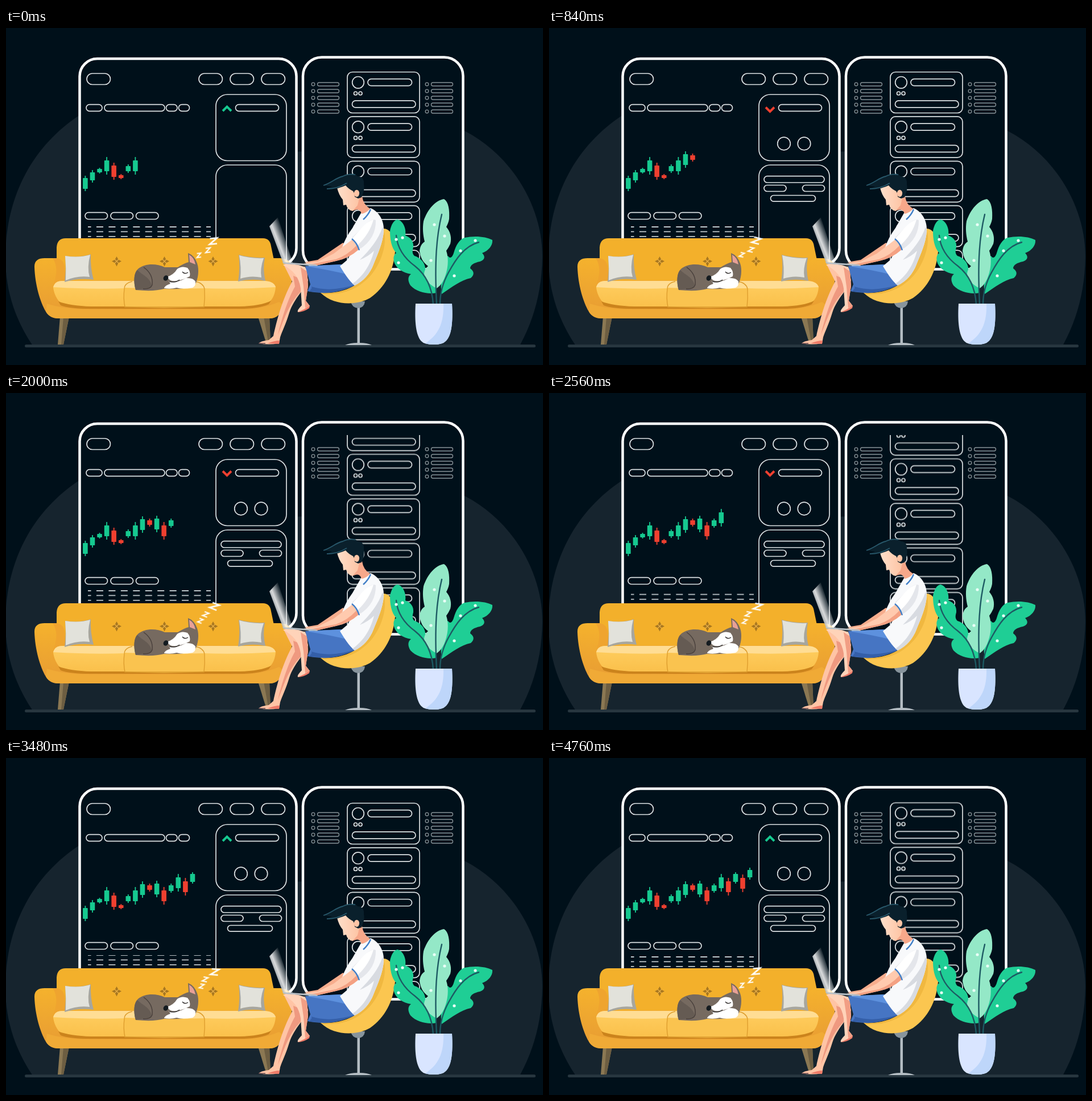
These frames come from a looping animation (944x593 px, 4800 ms). An HTML page:

```html
<!DOCTYPE html>
<html lang="en">
<head>
<meta charset="utf-8">
<title>Trading from home</title>
<style>
  html, body { margin: 0; width: 100%; height: 100%; overflow: hidden; background: #00101a; }
  svg { display: block; width: 944px; height: 593px; }
  .ui { fill: none; stroke: #dde1e3; stroke-width: 1.7; }
  .frame { fill: #00101a; stroke: #fff; stroke-width: 4.5; }
  .dim { opacity: .62; stroke-width: 1.3; }
  .anim, .z, .candle { animation: 4.8s linear infinite; }

  #cards { animation-name: cards; }
  @keyframes cards {
    0%, 22.9% { transform: translateY(0); animation-timing-function: ease-in; }
    33.33% { transform: translateY(10.5px); animation-timing-function: ease-out; }
    50.8% { transform: translateY(40.5px); animation-timing-function: ease-in-out; }
    65.83% { transform: translateY(3.5px); animation-timing-function: ease-out; }
    79.17%, 100% { transform: translateY(1.3px); }
  }
  #rows { animation-name: rows; }
  @keyframes rows {
    0%, 17.5% { transform: translateY(0); }
    33.33% { transform: translateY(-.8px); }
    53.33% { transform: translateY(-3.9px); }
    65.83% { transform: translateY(-2.9px); }
    79.17% { transform: translateY(-3.3px); }
    93%, 100% { transform: translateY(0); }
  }
  #buttons { animation-name: buttons; }
  @keyframes buttons { 0%, 5% { opacity: 0; } 9%, 100% { opacity: 1; } }
  #fields { animation-name: fields; }
  @keyframes fields { 0%, 8% { opacity: 0; } 12%, 100% { opacity: 1; } }

  #up { animation-name: up; animation-timing-function: step-end; }
  @keyframes up {
    0% { opacity: 1; } 16.33% { opacity: 0; } 59.5% { opacity: 1; }
    73.5% { opacity: 0; } 81.7%, 100% { opacity: 1; }
  }
  #down { animation-name: down; animation-timing-function: step-end; }
  @keyframes down {
    0% { opacity: 0; } 16.33% { opacity: 1; } 59.5% { opacity: 0; }
    73.5% { opacity: 1; } 81.7%, 100% { opacity: 0; }
  }
  #drop { animation-name: drop; }
  @keyframes drop {
    0%, 16.3% { transform: translateY(3px); }
    20%, 73.4% { transform: none; }
    73.5% { transform: translateY(3px); }
    77%, 100% { transform: none; }
  }

  .z { fill: none; stroke: #fff; }
  #z1 { animation-name: z1; }
  @keyframes z1 {
    0%, 100% { transform: translate(339px, 400px) rotate(-8deg); }
    17.5% { transform: translate(339px, 399px) rotate(12deg); }
    33.33% { transform: translate(340px, 400px) rotate(28deg); }
    53.33% { transform: translate(344px, 402px) rotate(10deg); }
    65.83% { transform: translate(345px, 402px) rotate(2deg); }
    79.17% { transform: translate(343px, 401px) rotate(18deg); }
  }
  #z2 { animation-name: z2; }
  @keyframes z2 {
    0%, 100% { transform: translate(355px, 391px) rotate(-8deg); }
    17.5% { transform: translate(355px, 390px) rotate(12deg); }
    33.33% { transform: translate(352px, 390px) rotate(28deg); }
    53.33% { transform: translate(350px, 389px) rotate(10deg); }
    65.83% { transform: translate(350px, 388px) rotate(0deg); }
    79.17% { transform: translate(350px, 391px) rotate(22deg); }
  }
  #z3 { animation-name: z3; }
  @keyframes z3 {
    0%, 100% { transform: translate(364.5px, 375px) rotate(-6deg); }
    17.5% { transform: translate(364.5px, 374px) rotate(14deg); }
    33.33% { transform: translate(366px, 375px) rotate(30deg); }
    53.33% { transform: translate(367px, 376px) rotate(10deg); }
    65.83% { transform: translate(367px, 376px) rotate(-3deg); }
    79.17% { transform: translate(367px, 377px) rotate(12deg); }
  }
</style>
</head>
<body>
<svg viewBox="0 0 944 593">
  <defs>
    <clipPath id="listClip"><rect x="598" y="74.3" width="132" height="334"/></clipPath>
    <clipPath id="rowClip"><rect x="140" y="347.4" width="222" height="40"/></clipPath>
    <linearGradient id="screen" x1="474" y1="379" x2="494" y2="371" gradientUnits="userSpaceOnUse">
      <stop offset="0" stop-color="#b9bec1" stop-opacity=".9"/><stop offset=".25" stop-color="#fff" stop-opacity=".85"/>
      <stop offset="1" stop-color="#fff" stop-opacity="0"/>
    </linearGradient>
    <linearGradient id="skin"><stop offset="0" stop-color="#ffdfca"/><stop offset="1" stop-color="#fdc3a3"/></linearGradient>
    <linearGradient id="arm" x2="0" y2="1"><stop offset="0" stop-color="#f5b22d"/><stop offset="1" stop-color="#e79b34"/></linearGradient>
    <linearGradient id="seat" x2="0" y2="1"><stop offset="0" stop-color="#ffce60"/><stop offset="1" stop-color="#fac04b"/></linearGradient>
  </defs>

  <path fill="#16242e" d="M47 559C14 510 -1 458 -1 405C-1 290 52 205 127 155C230 90 390 150 460 200C500 224 530 221 560 205C640 145 740 150 806 181C890 224 943 315 943 402C942 465 927 515 903 559Z"/>
  <rect x="33" y="557" width="898" height="5" rx="2.5" fill="#27363f"/>

  <!-- chart window -->
  <rect class="frame" x="129.5" y="54" width="381" height="364" rx="31"/>
  <g id="chartUi" class="ui">
    <rect x="369" y="117" width="124" height="116.5" rx="20"/>
    <rect x="369" y="241" width="124" height="190" rx="20"/>
  </g>
  <g id="buttons" class="ui anim"><circle cx="413" cy="203.5" r="11.3"/><circle cx="448.5" cy="203.5" r="11.3"/></g>
  <g id="fields" class="ui anim"></g>
  <g fill="none" stroke-width="4">
    <path id="up" class="anim" stroke="#16c990" d="M381 146L388.5 138.5L396 146"/>
    <g id="drop" class="anim"><path id="down" class="anim" stroke="#f04030" d="M381 137.5L388.5 145L396 137.5"/></g>
  </g>
  <g id="candles"></g>
  <g clip-path="url(#rowClip)"><g id="rows" class="anim" stroke="#c3c9cd" stroke-width="1.8"></g></g>

  <!-- list window -->
  <rect class="frame" x="522" y="51.5" width="281.5" height="373" rx="33"/>
  <g id="side" class="ui dim"></g>
  <g clip-path="url(#listClip)"><g id="cards" class="ui anim"></g></g>

  <!-- sofa -->
  <path fill="#8b7853" d="M95 508H111L101 557H91Z"/><path fill="#6d5e42" d="M101 508H111L101 557H97Z"/>
  <path fill="#8b7853" d="M443 508H463L465 553H457Z"/><path fill="#6d5e42" d="M453 508H463L465 553H461Z"/>
  <path fill="#f3b02b" d="M89 470V386Q90 370 105 370H452Q464 370 466 384L471 408V470Z"/>
  <path fill="url(#arm)" d="M50 420C50 409 57 405 68 405H88Q101 406 103 420L105 444H452L456 419Q457 406 470 405H482Q496 406 500 414L503 440C500 465 492 485 484 499Q477 511 464 511H92Q77 511 70 499C60 482 51 452 50 420Z"/>
  <path fill="#efa42f" d="M82 405H88Q101 406 103 420L105 446L83 452C90 435 91 418 82 405Z"/>
  <path fill="url(#seat)" d="M83 456Q86 445 99 445H455Q471 446 474 456C473 467 470 476 462 483Q444 491 410 491H150Q112 491 95 483C87 474 84 465 83 456Z"/>
  <path fill="#ffdd94" d="M83 456Q86 445 99 445H455Q471 446 474 456Q410 460 348 458H208Q150 460 83 456Z"/>
  <path fill="#cb831c" d="M92 481Q112 489 150 490H410Q448 489 466 480L462 486Q444 494 410 494H150Q112 494 96 488Z"/>
  <path fill="#f0aa36" d="M72 485Q100 495 150 495H410Q450 495 480 482L489 489Q480 511 464 511H92Q77 511 70 499Z"/>
  <path fill="#fac34f" d="M208 457Q212 447 227 446H335Q347 448 349 458L348 490Q278 495 208 490Z"/>
  <path fill="#ffdd94" d="M208 457Q212 447 227 446H335Q347 448 349 458Q278 460 208 457Z"/>
  <path fill="none" stroke="#dc9b2c" stroke-width="1.3" d="M222 446Q208 449 208 459Q206 476 209 491H348Q350 475 349 459Q347 449 333 446"/>
  <g id="studs"></g>
  <path fill="#a7a69e" d="M104 401Q128 405 149 398Q148 422 154 443Q128 439 103 447Q106 423 104 401Z"/>
  <path fill="#e2e2db" d="M104 401Q128 405 148 399Q142 422 147 438Q126 435 105 444Q106 423 104 401Z"/>
  <path fill="#a7a69e" d="M409 399Q430 405 455 404Q451 424 456 445Q432 440 408 446Q412 421 409 399Z"/>
  <path fill="#e2e2db" d="M410 400Q430 406 453 405Q446 424 449 439Q430 435 412 441Q414 421 410 400Z"/>

  <!-- dog -->
  <path fill="#766a60" d="M228 461C224 447 224 431 232 424C244 414 264 414 279 421L302 421Q313 414 321 412L320 396Q331 400 336 414C340 425 338 442 332 452Q318 461 278 459Q260 464 228 461Z"/>
  <path fill="#655b53" d="M228 461C224 447 225 431 231 426C240 435 252 438 256 452Q254 460 242 459Z"/>
  <path fill="none" stroke="#483f3b" stroke-width="1.4" d="M242 421Q259 433 257 452Q254 460 241 459"/>
  <path fill="#e8a097" d="M322 399Q331 404 333 416L323 412Z"/>
  <path fill="#fff" d="M283 438Q295 434 301 424Q309 418 319 422Q325 429 323 437Q312 443 300 445Q288 447 283 438Z"/>
  <path fill="#fff" d="M286 445Q300 450 316 440Q329 439 333 446Q334 454 328 457Q310 460 300 457Q290 460 278 458Q279 453 289 450Z"/>
  <path fill="none" stroke="#33302f" stroke-width="1.4" d="M310 429Q314 434 320 430M287 446Q298 449 305 443"/>
  <ellipse cx="281" cy="440" rx="4.2" ry="5" fill="#141b20" transform="rotate(30 281 440)"/>
  <path id="z1" class="z" stroke-width="1.9" d="M-3-3.5H4L-4 3.5H3.5"/>
  <path id="z2" class="z" stroke-width="2.1" d="M-3.5-3.7H4.5L-4.5 3.7H4"/>
  <path id="z3" class="z" stroke-width="2.7" d="M-5.5-5H7L-7 5H6"/>

  <!-- chair -->
  <path fill="#b4bdc3" d="M617.5 485H622V554Q635 554 643 558H596Q605 554 617.5 554Z"/>
  <path fill="#87949c" d="M606 481H631Q630 492 619 493Q608 492 606 481Z"/>
  <path fill="#fbc650" d="M663 353C677 352 685 372 684 394C681 428 666 457 640 475C618 488 578 490 553 466C580 470 602 460 614 454C636 444 652 400 663 353Z"/>
  <path fill="#f0b840" d="M665 358C671 390 652 430 629 447C609 464 583 470 557 468L553 466C580 468 602 460 614 452C636 444 654 400 665 358Z"/>

  <!-- plant -->
  <g fill="#1fce95">
    <path d="M757 466C742 469 722 465 711 453C706 445 706 437 712 433C698 431 687 423 683 414C680 406 681 399 686 396C677 386 675 371 675 357C677 346 682 338 688 337C698 339 704 353 702 365C712 369 717 376 716 386C714 393 714 397 718 401C728 404 736 412 737 422C738 430 742 431 746 436C756 447 757 457 757 466Z"/>
    <path d="M766 468C763 450 766 436 771 426C765 416 768 405 777 401C780 406 784 405 787 396C791 382 797 372 806 369C824 365 844 367 855 373C856 383 848 392 837 396C843 402 842 408 833 411C823 413 816 417 816 423C823 428 824 434 817 440C799 444 785 455 766 468Z"/>
  </g>
  <path fill="#94e8c7" d="M757 458C744 452 736 442 735 432C736 426 738 422 742 419C733 413 728 403 727 392C728 384 731 379 736 376C733 364 732 352 734 340C741 319 755 303 770 301C778 306 780 320 779 336C778 342 776 346 774 350C781 358 784 369 781 380C778 386 776 389 774 392C779 407 777 426 770 442C766 450 762 455 757 458Z"/>
  <g fill="none" stroke="#1d5a63" stroke-width="2.4" stroke-linecap="round">
    <path d="M686 365C688 388 700 405 719 419C738 434 749 455 751 486"/>
    <path d="M766 328C757 365 753 410 757 486"/>
    <path d="M831 377C805 384 790 408 778 430C768 448 763 465 763 486"/>
  </g>
  <g fill="#e9fff7">
    <circle cx="686" cy="372" r="2.6"/><circle cx="697" cy="369" r="2.6"/><circle cx="690" cy="413" r="2.6"/>
    <circle cx="753" cy="346" r="2.6"/><circle cx="747" cy="409" r="2.6"/><circle cx="771" cy="366" r="2.6"/>
    <circle cx="825" cy="374" r="2.6"/><circle cx="799" cy="392" r="2.6"/><circle cx="788" cy="436" r="2.6"/>
  </g>
  <path fill="#d9e5ff" d="M720 485H784C786 520 783 542 773 551Q768 557 752 557Q735 557 730 551C721 541 718 518 720 485Z"/>
  <path fill="#bed6fa" d="M769 485H784C786 520 783 542 773 551Q767 557 752 557Q744 557 737 555C760 540 770 520 769 485Z"/>

  <!-- laptop and person -->
  <path fill="url(#screen)" d="M463 349L478 333L504 413H487Z"/>
  <path fill="#ffc4a5" d="M488 416L526 420L531 444C527 458 507 474 498 501C492 521 486 532 482 544L480 555Q461 558 444 555Q447 551 462 549L470 542C476 515 485 479 503 446Z"/>
  <path fill="#ef9980" d="M505 436L508 455C497 474 486 506 478 540C488 516 496 486 518 464L522 443Z"/>
  <path fill="#ffd3b9" d="M492 415Q522 415 529 425L531 454L527 480L534 489Q525 498 513 500Q511 497 520 488L518 458C515 438 505 426 487 417Z"/>
  <path fill="#f29e84" d="M518 421L529 428L531 454L527 480L534 489L526 493L523 455Z"/>
  <path fill="#ef7b68" d="M513 500Q523 496 534 489L533 493Q523 500 513 500ZM460 555Q472 550 481 550L480 556Z"/>
  <path stroke="#513943" stroke-width="1.3" d="M444 555H456"/>
  <path fill="#4675c3" d="M526 419L590 416Q600 440 615 452Q590 464 565 466Q548 467 530 463L535 451Z"/>
  <path fill="#5d91de" d="M526 419L590 416L602 434Q570 426 526 419Z"/>
  <path fill="#345fa9" d="M532 464Q539 458 537 455Q572 466 615 451Q589 465 565 466Z"/>
  <path fill="#f7ad8d" d="M592 378L606 384L580 406L538 415L525 412L548 408Z"/>
  <path fill="#f8f9fb" d="M625 324L641 317C656 323 665 340 664 356C663 378 653 398 646 416C640 432 628 446 613 453C602 444 594 430 587 419L600 408L610 390L591 386Q597 368 609 352Z"/>
  <path fill="#d8dbe1" d="M662 350C655 372 640 390 622 408Q637 402 647 392C640 420 626 438 609 450L613 453C628 446 640 432 646 416C653 398 663 378 664 356Z"/>
  <path fill="#e4e6eb" d="M650 338Q642 335 633 345L608 369L622 389Q651 370 650 338Z"/>
  <path fill="#fff" d="M646 337Q635 340 624 353L609 370L618 382Q639 363 646 337Z"/>
  <path fill="#ffcaae" d="M609 372L621 389Q602 406 580 410L545 418L523 414L548 411L576 397Z"/>
  <path fill="#f4a183" d="M616 383L621 389Q602 406 580 410L545 418L535 416L580 407Q600 400 616 383Z"/>
  <path fill="none" stroke="#417fc7" stroke-width="2.4" d="M608 371Q617 378 621 391M628 337Q637 329 641 319"/>
  <path fill="#b9c1c7" d="M486 412L545 416L548 419L488 415Z"/>

  <path fill="#f7a88a" d="M609 302L626 296Q628 311 640 318Q633 326 625 327Q622 315 609 322Z"/>
  <path fill="url(#skin)" d="M582 281L598 274L614 288L622 296L618 312L609 322Q600 320 598 311L593 312L592 302Q585 294 582 281Z"/>
  <path fill="#0a202c" d="M558 277C573 272 579 264 592 261C604 255 617 257 618 261C627 261 630 268 629 275C631 285 627 292 625 298L619 300L613 297Q613 291 610 287Q602 283 597 277C588 281 573 286 563 283Q570 281 573 279Z"/>
  <ellipse cx="616.5" cy="291" rx="4.6" ry="6.2" fill="#ffc4a5"/>
  <path fill="none" stroke="#28586b" stroke-width="1.8" d="M558 277C573 272 579 264 592 261Q602 256 614 258M564 283Q583 283 599 273"/>
</svg>

<script>
  const LOOP = 4800, STEP = 392;
  const get = id => document.getElementById(id);
  const add = (id, markup) => get(id).insertAdjacentHTML('beforeend', markup);
  const pill = (x, y, w, h) => `<rect x="${x}" y="${y}" width="${w}" height="${h}" rx="${h / 2}"/>`;
  const dot = (x, y, r) => `<circle cx="${x}" cy="${y}" r="${r}"/>`;

  for (const x of [142, 339, 394, 449]) add('chartUi', pill(x, 80, 41.5, 19.5));
  for (const [x, w] of [[141, 28], [173, 106], [281.5, 19.5], [303.5, 19], [403.5, 76]])
    add('chartUi', pill(x, 134.7, w, 11.6));
  for (const x of [139, 184, 228.5]) add('chartUi', pill(x, 324.7, 39.5, 11.8));
  add('fields', pill(378, 260.7, 106, 11.3) + pill(378, 276.5, 39, 11) +
    pill(445.5, 276.5, 39, 11) + pill(389.5, 294.5, 79, 10.6));

  for (let i = 0; i < 5; i++) {
    const y = 99 + i * 12;
    for (const x of [540, 740]) add('side', dot(x, y, 2.8) + pill(x + 7.5, y - 3, 38, 6));
  }
  for (let i = -1; i < 5; i++)
    add('cards', `<g transform="translate(600 ${77.5 + i * 78.4})">
      <rect width="127" height="72" rx="9"/>${dot(19, 18.3, 10.3)}${pill(36, 12.2, 77.5, 12)}
      ${dot(14.5, 37.5, 3)}${dot(23, 37.5, 3)}${pill(8.5, 50.4, 111.5, 12)}</g>`);

  for (let y = 350; y < 385; y += 8.4)
    add('rows', `<path stroke-dasharray="12 9.45" stroke-dashoffset="6.5" d="M144 ${y}H360"/>`);

  for (const x of [194.5, 278.5, 364])
    add('studs', `<path fill="#a8771f" d="M${x} 402l3 5.5 5.5 3-5.5 3-3 6-3-6-5.5-3 5.5-3z"/>
      <path stroke="#e9b04a" stroke-width="1.2" d="M${x - 3.5} 407l7 7m0-7l-7 7"/>`);

  // body top, body height, wick overhang; a negative height marks a fall
  const candles = [[264, 19, 4], [254, 14, 4], [248, 6, 2], [233, 19, 6], [242, -20, 5], [259, -5, 2],
    [243, 9, 3], [233, 19, 6], [222, 19, 5], [224, -8, 3], [221, 19, 5], [233, -19, 6],
    [224, 10, 3], [210, 19, 6], [217, -19, 6], [204, 14, 3], [211, -19, 6], [197, 13, 4]];
  let rules = '';
  candles.forEach(([y, size, tip], i) => {
    const x = 139.4 + i * 12.57, h = Math.abs(size);
    const late = i > 7;
    if (late) rules += `@keyframes in${i}{0%{opacity:0}${(i - 7) * STEP / LOOP * 100}%,100%{opacity:1}}`;
    add('candles', `<g fill="${size < 0 ? '#f04030' : '#16c990'}"
      ${late ? `class="candle" style="animation-name:in${i};animation-timing-function:step-end"` : ''}>
      <rect x="${x - 4.3}" y="${y}" width="8.6" height="${h}" rx=".8"/>
      <rect x="${x - .9}" y="${y - tip}" width="1.8" height="${h + 2 * tip}"/></g>`);
  });
  document.head.insertAdjacentHTML('beforeend', `<style>${rules}</style>`);
</script>
</body>
</html>
```
